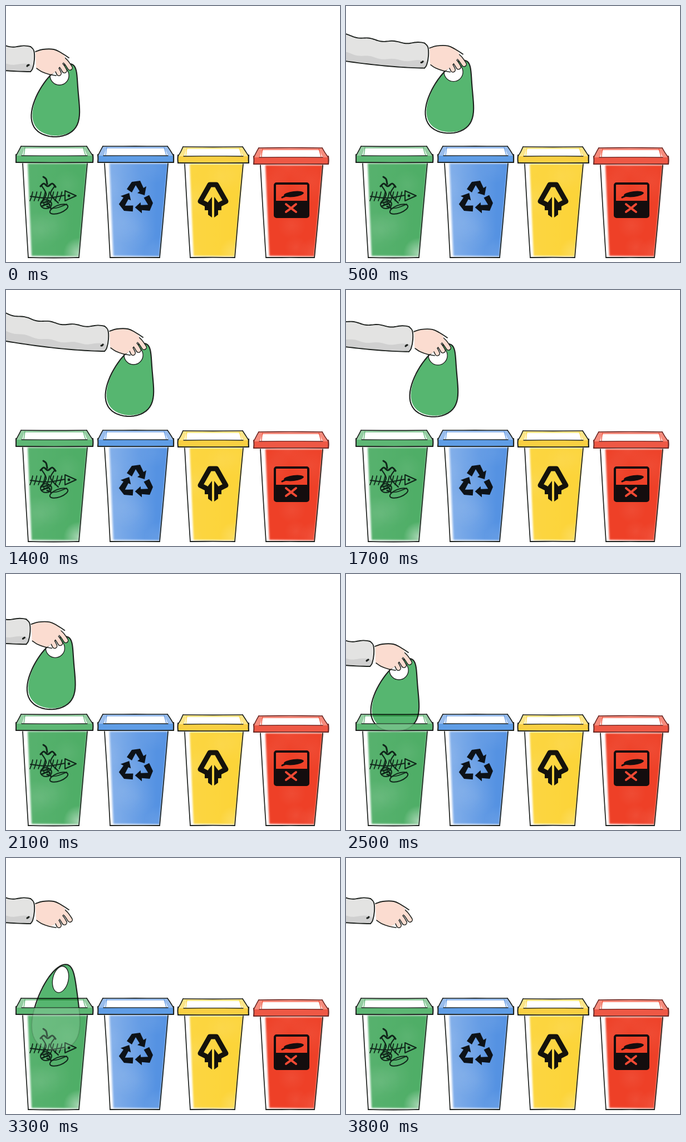
An HTML page with a canvas that plays this animation: 600 by 460 pixels, repeating every 4.3 s.

```html
<!DOCTYPE html>
<html lang="en">
<head>
<meta charset="utf-8">
<title>Sorting bins</title>
<style>
html, body { margin: 0; width: 600px; height: 460px; overflow: hidden; background: #fff; }
canvas { display: block; }
</style>
</head>
<body>
<canvas id="stage" width="600" height="460"></canvas>
<script>
const W = 600, H = 460, LOOP = 4300, STEP = 100;
const INK = '#1d211e', SKIN = '#fbdcd0';
const stage = document.getElementById('stage').getContext('2d');

const scene = document.createElement('canvas');
scene.width = W;
scene.height = H;

let seed = 7;
const random = () => (seed = (seed * 16807) % 2147483647) / 2147483647;

// Paths: flat lists of x, y
function polygon(p) {
  const path = new Path2D();
  for (let i = 0; i < p.length; i += 2) path.lineTo(p[i], p[i + 1]);
  path.closePath();
  return path;
}

// Smooth open curve through the points
function curve(p) {
  const path = new Path2D(), last = p.length / 2 - 1;
  const at = i => {
    const k = 2 * Math.max(0, Math.min(last, i));
    return [p[k], p[k + 1]];
  };
  path.moveTo(p[0], p[1]);
  for (let i = 0; i < last; i++) {
    const [a, b, c, d] = [at(i - 1), at(i), at(i + 1), at(i + 2)];
    path.bezierCurveTo(
      b[0] + (c[0] - a[0]) / 6, b[1] + (c[1] - a[1]) / 6,
      c[0] - (d[0] - b[0]) / 6, c[1] - (d[1] - b[1]) / 6, c[0], c[1]);
  }
  return path;
}

function ellipse(x, y, rx, ry, tilt = 0) {
  const path = new Path2D();
  path.ellipse(x, y, rx, ry, tilt, 0, 2 * Math.PI);
  return path;
}

function ink(c, path, width = 1.9, color = INK) {
  c.lineWidth = width;
  c.strokeStyle = color;
  c.lineCap = c.lineJoin = 'round';
  c.stroke(path);
}

function paint(c, path, color) {
  c.fillStyle = color;
  c.fill(path);
}

// A hand-drawn line with a slight bow
function pencil(c, x0, y0, x1, y1, width, color) {
  const bow = () => random() - 0.5;
  ink(c, curve([x0, y0, (x0 + x1) / 2 + bow(), (y0 + y1) / 2 + bow(), x1, y1]), width, color);
}

function blot(c, x, y, r, rgb, alpha) {
  const g = c.createRadialGradient(x, y, 0, x, y, r);
  g.addColorStop(0, `rgba(${rgb},${alpha})`);
  g.addColorStop(1, `rgba(${rgb},0)`);
  c.fillStyle = g;
  c.fillRect(x - r, y - r, 2 * r, 2 * r);
}

function drawBin(c, { left, right, top, color, lipColor, glow, fade, line = INK }) {
  const front = top + 17, lip = front + 12, neck = lip + 2, base = 452;
  const [back0, back1] = [left + 9, right - 11];
  const [neck0, neck1] = [left + 12, right - 10];
  const [base0, base1] = [left + 22, right - 25];

  // The wash leaves a bare strip on the left
  const wash = polygon([neck0 + 9, neck, neck1, neck, base1, base - 2, base0 + 6, base - 3]);
  c.filter = 'blur(1.5px)';
  paint(c, wash, color);
  c.filter = 'none';
  c.save();
  c.clip(wash);
  const sheen = c.createLinearGradient(neck0, 0, right - 30, 0);
  sheen.addColorStop(0, `rgba(255,255,255,${glow})`);
  sheen.addColorStop(1, 'rgba(255,255,255,0)');
  c.fillStyle = sheen;
  c.fillRect(left, neck, right - left, base - neck);
  for (let i = 0; i < 5; i++) {
    blot(c, neck0 + random() * 100, neck + random() * 160, 20 + random() * 20, '255,255,255', 0.06);
  }
  c.restore();
  blot(c, base1, base - 8, 28, '255,255,255', fade);

  // Rim, opening and lip
  c.globalAlpha = 0.6;
  paint(c, polygon([back0, top, back1, top, right, front, left, front]), color);
  c.globalAlpha = 1;
  paint(c, polygon([back0 + 6, top + 4, back1 - 5, top + 4, right - 10, front, left + 11, front]), '#fff');
  paint(c, polygon([left, front, right, front, right, lip, left, lip]), lipColor);
  for (const [x0, x1] of [[back0 + 7, left + 14], [back1 - 6, right - 13]]) {
    pencil(c, x0, top + 2, x1, front - 1, 1.2, color);
  }
  pencil(c, back0, top, back1, top, 1.6, line);
  pencil(c, back0, top, left, front, 1.6, line);
  pencil(c, back1, top, right, front, 1.6, line);
  pencil(c, left + 10, front, right - 10, front, 1.3, line);
  pencil(c, left, front - 2, left, lip, 2, line);
  pencil(c, right, front - 2, right, lip, 2.2, line);
  pencil(c, left, lip, right, lip, 1.8, line);
  pencil(c, neck0, neck, base0, base, 1.7);
  pencil(c, neck1, neck, base1, base, 1.7);
  pencil(c, base0, base, base1, base, 1.9);
}

// Fish bones, an apple core and a slice
function drawFoodIcon(c) {
  const dark = '#10261a', stroke = (p, w = 1.8) => ink(c, curve(p), w, dark);
  stroke([67, 307, 72, 311, 74, 320], 3);
  stroke([62, 324, 68, 319, 75, 324, 83, 319, 89, 325], 3.2);
  for (const side of [-1, 1]) stroke([76 + side * 12, 323, 76 + side * 4, 338, 79 + side * 15, 354], 2.2);
  stroke([44, 342, 74, 345, 106, 340], 2);
  for (let i = 0; i < 8; i++) stroke([48 + i * 7.5, 334, 46 + i * 7.5, 342, 43 + i * 7.5, 350]);
  ink(c, polygon([106, 332, 126, 341, 106, 350]), 2, dark);
  paint(c, ellipse(113, 341, 2.4, 2.4), dark);
  ink(c, ellipse(72, 356, 10, 8), 2, dark);
  for (let i = 0; i < 24; i++) paint(c, ellipse(64 + random() * 16, 350 + random() * 12, 1.6, 1.6), dark);
  ink(c, ellipse(95, 365, 17, 7, -0.35), 2, dark);
  stroke([80, 364, 94, 362, 109, 356]);
}

function drawRecycleIcon(c) {
  const arrow = polygon([-17, -17, -8, -30, 7, -32, 13, -19, 18, -22, 15, -6, 2, -10, 6, -13, -1, -24, -8, -11]);
  c.save();
  c.translate(234, 346);
  for (let i = 0; i < 3; i++) {
    paint(c, arrow, '#0d1218');
    c.rotate(2 * Math.PI / 3);
  }
  c.restore();
}

function drawArrowIcon(c) {
  const dark = '#14120c', half = polygon([2, -10, 15, 7, 15, 14, 9, 14, 9, 22, 2, 27]);
  ink(c, new Path2D('M359 356L349 351L366 321H378L395 351L385 356'), 9, dark);
  for (const side of [-1, 1]) {
    c.save();
    c.translate(372, 353);
    c.scale(side, 1);
    paint(c, half, dark);
    c.restore();
  }
}

function drawResidualIcon(c) {
  const dark = '#140d0e', frame = new Path2D();
  frame.roundRect(483, 319, 60, 60, 3);
  ink(c, frame, 4, dark);
  c.fillStyle = dark;
  c.fillRect(483, 350, 60, 28);
  paint(c, ellipse(517, 338, 18, 5, -0.12), dark);
  pencil(c, 496, 344, 508, 339, 3, dark);
  for (const side of [-1, 1]) pencil(c, 512 - side * 9, 356, 512 + side * 9, 370, 4, '#f04a34');
}

function buildScene() {
  const c = scene.getContext('2d');
  c.fillStyle = '#fff';
  c.fillRect(0, 0, W, H);
  [
    { left: 18, right: 156, top: 252, color: '#4fae67', lipColor: '#5db774', glow: 0.05, fade: 0.5 },
    { left: 165, right: 301, top: 252, color: '#5592e2', lipColor: '#5f9de6', glow: 0.3, fade: 0.1 },
    { left: 309, right: 436, top: 253, color: '#fcd439', lipColor: '#f9cf42', glow: 0.05, fade: 0.2 },
    { left: 445, right: 579, top: 255, color: '#ee4027', lipColor: '#ee5845', glow: 0, fade: 0.1, line: '#6d2925' },
  ].forEach(bin => drawBin(c, bin));
  drawFoodIcon(c);
  drawRecycleIcon(c);
  drawArrowIcon(c);
  drawResidualIcon(c);
}

// Pear outline: narrow and leaning at the top, full at the bottom
function bagBody(top, bottom, centre, lean) {
  const points = [];
  for (let a = 0; a < 2 * Math.PI; a += 0.1) {
    const u = (1 - Math.cos(a)) / 2;
    points.push(centre + lean * (1 - u) ** 3 + Math.sin(a) * (32 + 31 * u * u), top + (bottom - top) * u);
  }
  return polygon(points);
}

const heldBag = { body: bagBody(104, 235, 88, 26), hole: ellipse(96, 125, 17, 17) };
const looseBag = { body: bagBody(113, 268, 89, 18), hole: ellipse(98, 140, 14, 24, 0.22) };

function drawBag(c, { body, hole }) {
  paint(c, body, '#fff');
  c.save();
  c.clip(body);
  c.translate(2, -2);
  paint(c, body, '#56b670');
  c.restore();
  paint(c, hole, '#fff');
  ink(c, hole, 1.3);
  ink(c, body, 2.1);
}

// Sleeve edges widen away from the cuff
const CUFF = 44, REACH = 194;
function edge(rule) {
  const points = [];
  for (let x = CUFF; x >= CUFF - REACH; x -= 6) points.push(x, rule(x, (CUFF - x) / REACH));
  return points;
}
const topEdge = edge((x, s) => 73 - 28 * s ** 2 + 1.5 * Math.sin(x / 7));
const lowEdge = edge((x, s) => 118 - 21 * s ** 1.65);
const cuff = curve([topEdge[0], topEdge[1], 50, 80, 51, 96, 48, 112, lowEdge[0], lowEdge[1]]);
const sleeve = curve(topEdge);
sleeve.lineTo(CUFF - REACH, 97);
sleeve.addPath(curve(lowEdge));
const sleeveFill = new Path2D(cuff);
for (let i = 0; i < lowEdge.length; i += 2) sleeveFill.lineTo(lowEdge[i], lowEdge[i + 1]);
for (let i = topEdge.length - 2; i >= 0; i -= 2) sleeveFill.lineTo(topEdge[i], topEdge[i + 1]);

const palm = curve([53, 82, 66, 78, 86, 78, 100, 84, 106, 95, 94, 112, 80, 123, 62, 117, 54, 111]);
const handTop = curve([53, 82, 66, 78, 86, 78, 99, 84, 113, 93]);
const handLow = curve([55, 112, 64, 118, 78, 123, 90, 125]);

function drawArm(c) {
  paint(c, sleeveFill, '#e3e3e2');
  c.save();
  c.clip(sleeveFill);
  c.translate(0, 32);
  paint(c, sleeveFill, '#d0d0d0');
  c.restore();
  ink(c, sleeve);
  ink(c, cuff);
  pencil(c, 38, 108, 41, 106, 3.2);

  for (let i = 2; i >= 0; i--) {
    const finger = curve([98 - 6 * i, 92 + 7 * i, 108 - 8 * i, 101 + 7 * i, 115 - 10 * i, 111 + 5 * i]);
    ink(c, finger, 10);
    ink(c, finger, 7, SKIN);
  }
  paint(c, palm, SKIN);
  ink(c, handTop, 1.8);
  ink(c, handLow, 1.6);
}

const RELEASE = 3000, FALL = 600, DROP = 237, LIP = 269, FLOOR = 428;

// Smooth rise from 0 to 1 between two times
function ease(t, from, to) {
  const u = Math.max(0, Math.min(1, (t - from) / (to - from)));
  return u * u * (3 - 2 * u);
}

// Rounded bump of height 1 around a time
function bump(t, centre, spread) {
  const u = Math.min(1, Math.abs(t - centre) / spread);
  return Math.cos(u * Math.PI / 2) ** 2;
}

// Reach to the second bin, dip, return past the first one, dip again
function handAt(t) {
  return [
    142 * ease(t, 0, 800) - 151 * ease(t, 1270, 2150) + 9 * ease(t, 2100, 2600),
    8 * (ease(t, 1600, 2100) - ease(t, 0, 700)) + 23 * bump(t, 1100, 200) + 48 * bump(t, 2500, 550) * (t < RELEASE),
  ];
}

function drawBand(c, y0, y1, x, y, bag, alpha) {
  c.save();
  c.beginPath();
  c.rect(0, y0, W, y1 - y0);
  c.clip();
  c.globalAlpha = alpha;
  c.translate(x, y);
  drawBag(c, bag);
  c.restore();
}

function render(t) {
  const c = stage, [x, y] = handAt(t);
  const falling = t >= RELEASE, bag = falling ? looseBag : heldBag;
  const fallen = falling ? DROP * ((t - RELEASE) / FALL) ** 1.6 : 0;
  const visible = t < RELEASE + FALL + 2 * STEP;

  c.fillStyle = '#fff';
  c.fillRect(0, 0, W, H);
  if (visible) drawBand(c, 0, LIP, x, y + fallen, bag, 1);
  c.globalCompositeOperation = 'multiply';
  c.drawImage(scene, 0, 0);
  c.globalCompositeOperation = 'source-over';
  // The bag shows faintly through the bin wall
  if (visible) drawBand(c, LIP, FLOOR, x, y + fallen, bag, 0.15);

  c.save();
  c.translate(x, y);
  drawArm(c);
  c.restore();
}

const start = performance.now();

function tick() {
  render(Math.floor((performance.now() - start) % LOOP / STEP) * STEP);
  requestAnimationFrame(tick);
}

buildScene();
tick();
</script>
</body>
</html>
```
